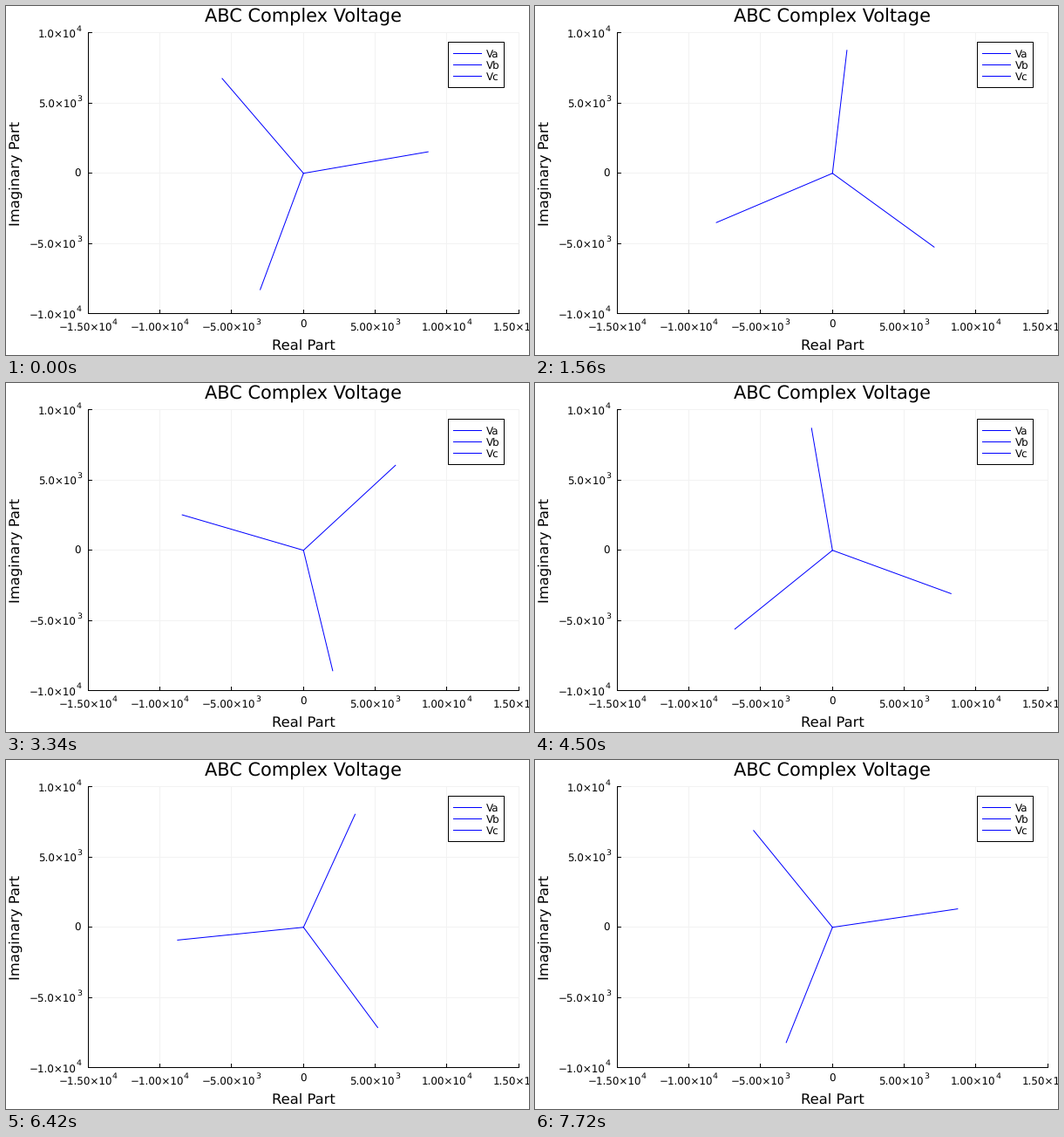
A matplotlib script that plays this animation: 600x400 px, repeating every 7740 ms.

```python
import numpy as np
import matplotlib.pyplot as plt
from matplotlib.animation import FuncAnimation
from matplotlib.patches import Rectangle

W, H, DPI = 600, 400, 100
PX = 72 / DPI                       # points per pixel
LEFT, RIGHT, TOP, BOTTOM = 94.4, 588.15, 30.9, 352.6
CX, CY = (LEFT + RIGHT) / 2, (TOP + BOTTOM) / 2
SX, SY = (RIGHT - LEFT) / 30000, (BOTTOM - TOP) / 20000

AMP, PHASE, FREQ, DT = 8820, np.radians(10), 60, 1e-4
TICK, SUP, GUIDE, TITLE = 11.9, 9.4, 16.35, 20.83    # font sizes in pixels
GRID = "#f2f2f2"

plt.rcParams.update({"font.family": "DejaVu Sans", "text.hinting": "none"})

fig = plt.figure(figsize=(W / DPI, H / DPI), dpi=DPI, facecolor="white")
ax = fig.add_axes([0, 0, 1, 1])
ax.set(xlim=(0, W), ylim=(H, 0))
ax.axis("off")


def seg(x0, y0, x1, y1, color="black", z=2):
    """Straight one-pixel line that fills the pixels its ends lie in."""
    x, y = np.floor([x0, x1]), np.floor([y0, y1])
    ax.plot(x, y, color=color, lw=PX, zorder=z, solid_capstyle="projecting")


def label(x, y, s, size=TICK, ha="center", **kw):
    return ax.text(x, y, s, fontsize=size * PX, ha=ha, va="baseline", **kw)


def power_label(x, y, s, exp, ha):
    """Mantissa with a raised exponent right after it."""
    main = label(x, y, s, ha=ha)
    ax.annotate(exp, xy=(1, y - 8), xycoords=(main, "data"),
                fontsize=SUP * PX, ha="left", va="baseline",
                annotation_clip=False)


def sci(v, digits):
    exp = int(np.floor(np.log10(abs(v))))
    s = f"{v / 10**exp:.{digits}f}×10".replace("-", "−")
    return s, str(exp)


# Grid, ticks and tick labels
for v in range(-15000, 15001, 5000):
    x = CX + v * SX
    seg(x, TOP, x, BOTTOM, GRID, 1)
    seg(x, BOTTOM, x, BOTTOM - 4.5)
    if v:
        power_label(x - 3.4, 372.7, *sci(v, 2), "center")
    else:
        label(x - 0.3, 368.6, "0")

for v in range(-10000, 10001, 5000):
    y = CY - v * SY
    seg(LEFT, y, RIGHT, y, GRID, 1)
    seg(LEFT, y, LEFT + 4.5, y)
    if v:
        power_label(81, y + 5.8, *sci(v, 1), "right")
    else:
        label(85.4, y + 4.3, "0", ha="right")

seg(LEFT, TOP, LEFT, BOTTOM)
seg(LEFT, BOTTOM, RIGHT, BOTTOM)

# Titles
label(CX, 19, "ABC Complex Voltage", TITLE)
label(CX - 0.3, 394, "Real Part", GUIDE)
ax.text(11, CY, "Imaginary Part", fontsize=GUIDE * PX, rotation=90,
        ha="center", va="center")

# Legend
ax.add_patch(Rectangle((507, 41), 64, 52, fc="white", ec="black",
                       lw=PX, zorder=4))
for i, name in enumerate(("Va", "Vb", "Vc")):
    y = 54 + 13 * i
    seg(513, y, 545, y, "blue", 5)
    label(551, y + 5, name, ha="left", zorder=5)

phasors = [ax.plot([], [], color="blue", lw=PX, zorder=3,
                   solid_capstyle="projecting")[0] for _ in range(3)]


def step_at(tick):
    """Steps last 1, 5 and 1 ticks in turn."""
    group, r = divmod(tick, 7)
    return 3 * group + (r > 0) + (r > 5)


def update(tick):
    angle = PHASE + 2 * np.pi * FREQ * DT * step_at(tick)
    for k, line in enumerate(phasors):
        a = angle - k * 2 * np.pi / 3
        line.set_data([CX, CX + AMP * np.cos(a) * SX],
                      [CY, CY - AMP * np.sin(a) * SY])
    return phasors


anim = FuncAnimation(fig, update, frames=387, interval=20, repeat=True,
                     repeat_delay=0, blit=False)
plt.show()
```
